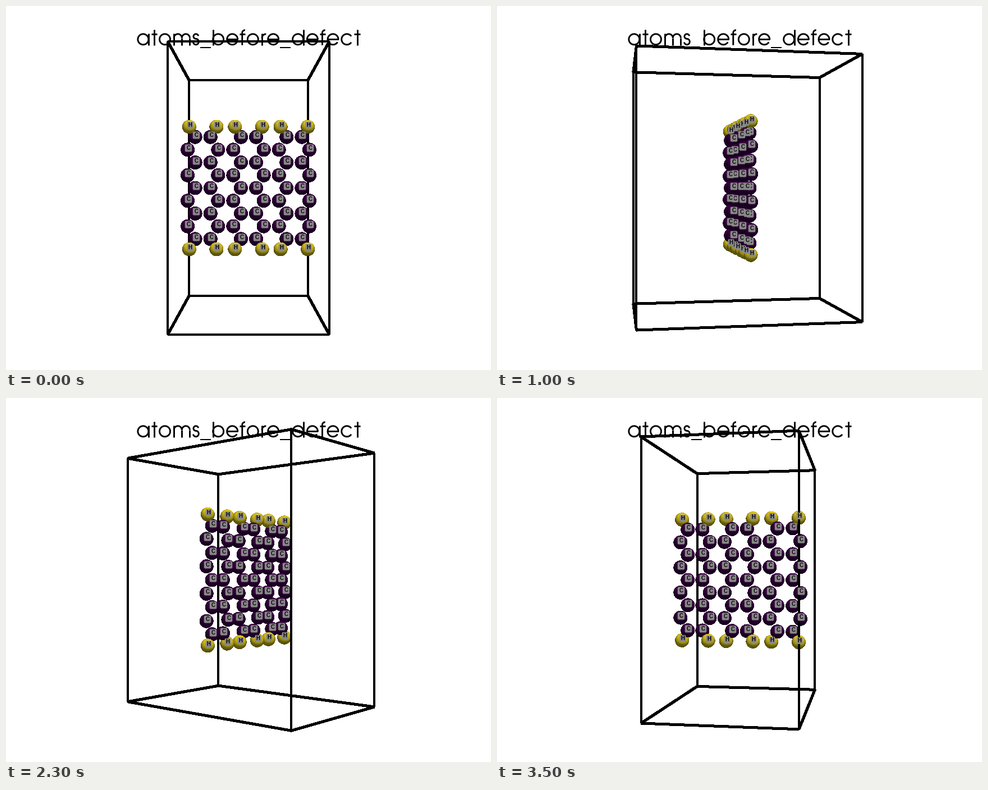
These frames come from a looping animation (864x648 px, 3600 ms). A matplotlib script:

```python
import numpy as np
import matplotlib.pyplot as plt
from matplotlib.animation import FuncAnimation
from matplotlib.collections import LineCollection
from matplotlib.patches import FancyBboxPatch

W, H = 864, 648
CX, CY = W / 2, H / 2
FOCAL = CY / np.tan(np.radians(15))
FRAMES = 36
BOX = np.array([122.0, 221.2, 184.5])  # half extents, px at the focal plane
CELL = 2 * BOX[0] / 3
RADIUS = 12.5

fig = plt.figure(figsize=(W / 72, H / 72), dpi=72, facecolor="white")
ax = fig.add_axes([0, 0, 1, 1])
ax.set_xlim(0, W)
ax.set_ylim(H, 0)
ax.axis("off")


def project(p, angle):
    """Turn points about the vertical axis; return screen x, y and depth."""
    c, s = np.cos(angle), np.sin(angle)
    x = p[:, 0] * c + p[:, 2] * s
    z = p[:, 2] * c - p[:, 0] * s
    k = 1 / (1 - z / FOCAL)
    return CX + x * k, CY - p[:, 1] * k, z


# --- ribbon of atoms -------------------------------------------------------
def build_atoms():
    carbon, hydrogen = [], []
    for centre in (CELL, 0, -CELL):
        for row in range(9):
            dx = CELL / 6 if row % 2 == 0 else CELL / 3
            for side in (-1, 1):
                carbon.append((centre + side * dx, 22.7 * (4 - row), 0))
        for y in (109, -109):
            for side in (-1, 1):
                hydrogen.append((centre + side * 24.2, y, 0))
    kinds = "C" * len(carbon) + "H" * len(hydrogen)
    return np.array(carbon + hydrogen, float), kinds


atoms, kinds = build_atoms()
BASE = {"C": np.array([68, 1, 84]) / 255, "H": np.array([253, 231, 37]) / 255}


def light(elev, azim, power, tint=(1, 1, 1)):
    e, a = np.radians([elev, azim])
    way = np.array([np.sin(a) * np.cos(e), np.sin(e), np.cos(a) * np.cos(e)])
    return way, power * np.array(tint)


LIGHTS = [
    light(50, 10, 0.75, (1, 0.97, 0.9)),
    light(-75, 0, 0.25, (0.93, 0.97, 1)),
    light(0, 0, 0.25),
    light(0, 110, 0.214),
    light(0, -110, 0.214),
]


def stamp(canvas, cx, cy, base):
    x0, y0 = int(cx - RADIUS) - 1, int(cy - RADIUS) - 1
    n = int(2 * RADIUS) + 4
    yy, xx = np.mgrid[y0:y0 + n, x0:x0 + n]
    u = (xx + 0.5 - cx) / RADIUS
    v = (cy - yy - 0.5) / RADIUS
    r2 = u * u + v * v
    inside = r2 <= 1
    normal = np.stack([u, v, np.sqrt(np.clip(1 - r2, 0, 1))], axis=-1)
    shade = sum(np.clip(normal @ d, 0, None)[..., None] * c for d, c in LIGHTS)
    patch = canvas[y0:y0 + n, x0:x0 + n]
    patch[inside, :3] = np.clip(shade * base, 0, 1)[inside]
    patch[inside, 3] = 1


balls = ax.imshow(np.zeros((H, W, 4)), extent=(0, W, H, 0), aspect="auto",
                  interpolation="nearest", zorder=2)

# --- cell outline ----------------------------------------------------------
corners = np.array([(x, y, z) for x in (-1, 1) for y in (-1, 1)
                    for z in (-1, 1)]) * BOX
edges = [(i, i | bit) for i in range(8) for bit in (1, 2, 4) if not i & bit]
outline = [ax.plot([], [], color="black", lw=4, antialiased=False,
                   solid_capstyle="butt")[0] for _ in edges]

# --- labels ----------------------------------------------------------------
LABEL_SIZE = {"C": (12.5, 13), "H": (11, 12)}
labels = []
for i, kind in enumerate(kinds):
    w, h = LABEL_SIZE[kind]
    tag = FancyBboxPatch((0, 0), w, h, lw=0, fc="#888888", zorder=10 + 2 * i,
                         boxstyle="round,pad=0,rounding_size=2")
    ax.add_patch(tag)
    letter = ax.text(0, 0, kind, ha="center", va="baseline", color="black",
                     family="Liberation Sans", weight="bold", size=9.6,
                     zorder=11 + 2 * i)
    labels.append((tag, letter))


def place_labels(xs, ys):
    """Earlier labels win; later ones that would cover their text are hidden."""
    taken = []
    for (tag, letter), kind, x, y in zip(labels, kinds, xs, ys):
        free = all(abs(x - a) > 5.2 or abs(y - b) > 7 for a, b in taken)
        tag.set_visible(free)
        letter.set_visible(free)
        if not free:
            continue
        taken.append((x, y))
        w, h = LABEL_SIZE[kind]
        lx, ly = np.round(x + 1.5), np.round(y - 3)
        tag.set_bounds(lx - w / 2, ly - h / 2, w, h)
        letter.set_position((lx, ly + 3))


# --- title, drawn with geometric strokes (1000 units per em) ---------------
def arc(cx, cy, rx, ry, start, end):
    t = np.radians(np.linspace(start, end, 48))
    return np.column_stack([cx + rx * np.cos(t), cy + ry * np.sin(t)])


def line(*pts):
    return np.array(pts, float)


def ring(cx):
    return arc(cx, 273, 250, 250, 0, 360)


def stem(x, top):
    return line((x, 0), (x, top))


def arch(cx):
    return arc(cx, 338, 185, 185, 0, 180)


GLYPHS = {
    "a": (683, [ring(332), stem(584, 547)]),
    "b": (682, [ring(350), stem(98, 740)]),
    "c": (647, [arc(328, 273, 250, 250, 35, 325)]),
    "d": (685, [ring(334), stem(586, 740)]),
    "e": (650, [np.vstack([line((80, 268), (576, 268)),
                           arc(327, 273, 250, 250, 0, 328)])]),
    "f": (314, [np.vstack([stem(140, 580), arc(275, 580, 135, 125, 180, 90)]),
                line((22, 512), (290, 512))]),
    "m": (938, [stem(98, 547), stem(469, 338), stem(840, 338),
                arch(283), arch(655)]),
    "o": (655, [ring(327)]),
    "r": (301, [stem(98, 547), arc(275, 335, 177, 182, 180, 85)]),
    "s": (388, [np.vstack([arc(190, 410, 115, 113, 10, 250),
                           arc(190, 161, 130, 137, 65, -170)])]),
    "t": (339, [stem(169, 740), line((28, 512), (310, 512))]),
    "_": (500, [line((0, -100), (500, -100))]),
}


def draw_title(text, baseline, em):
    k = em / 1000
    x = CX - sum(GLYPHS[ch][0] for ch in text) * k / 2
    strokes, widths = [], []
    for ch in text:
        advance, parts = GLYPHS[ch]
        for part in parts:
            strokes.append(part * (k, -k) + (x, baseline))
            widths.append(2 if ch == "_" else 2.9)
        x += advance * k
    ax.add_collection(LineCollection(strokes, colors="black", linewidths=widths,
                                     capstyle="butt", zorder=200),
                      autolim=False)


draw_title("atoms_before_defect", 69.7, 38)


def draw(i):
    angle = 2 * np.pi * i / FRAMES

    x, y, z = project(corners, angle)
    for art, (a, b) in zip(outline, edges):
        art.set_data([x[a], x[b]], [y[a], y[b]])
        art.set_zorder(3 if z[a] + z[b] > 0 else 1)

    x, y, z = project(atoms, angle)
    canvas = np.zeros((H, W, 4))
    for n in np.argsort(z, kind="stable"):
        stamp(canvas, x[n], y[n], BASE[kinds[n]])
    balls.set_data(canvas)
    place_labels(x, y)
    return []


anim = FuncAnimation(fig, draw, frames=FRAMES, interval=100, repeat=True)
plt.show()
```
